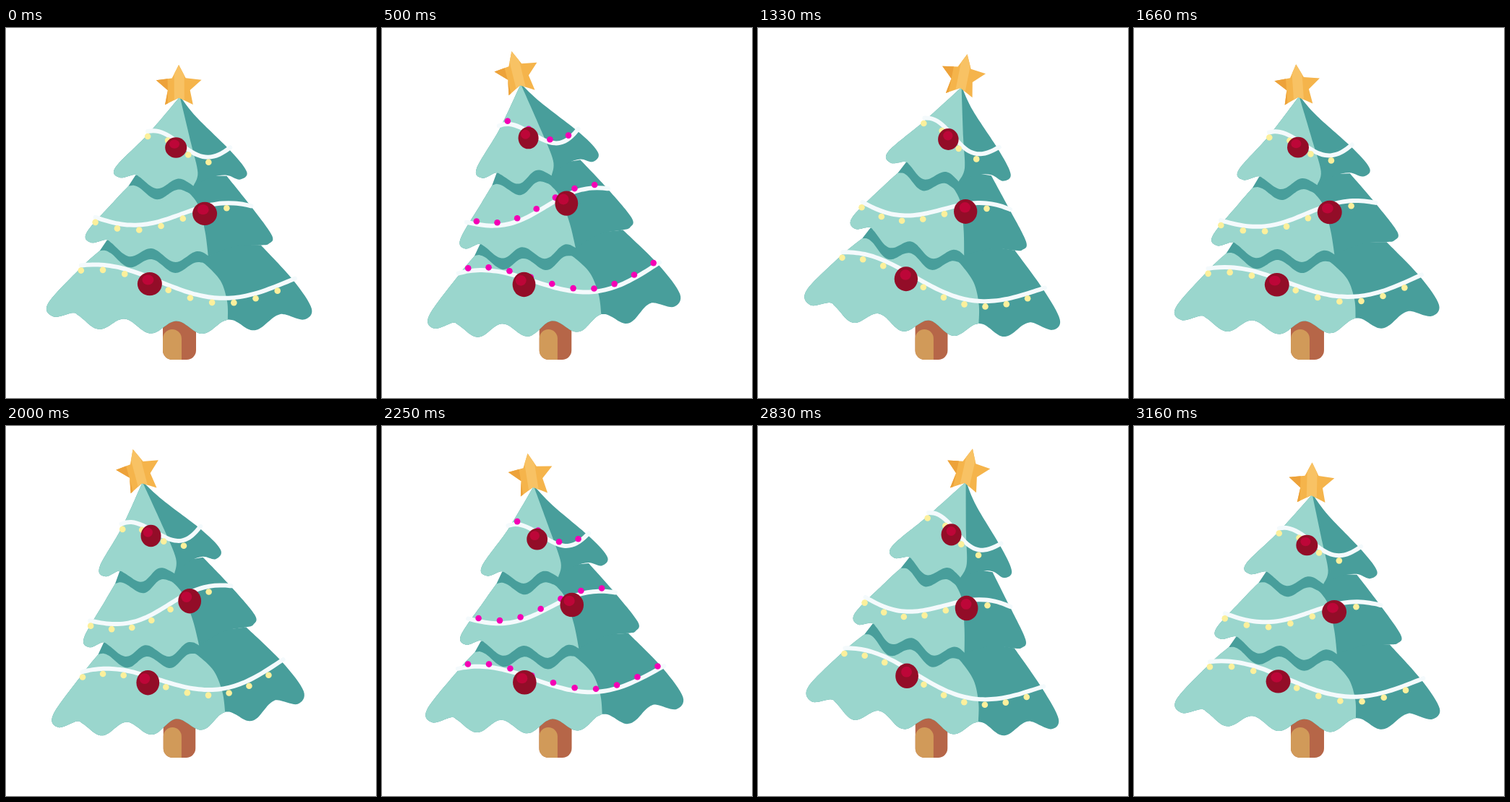
Write an HTML page with a canvas that moves like this. It is 512x512 px and loops after 3250 ms.

```html
<!DOCTYPE html>
<html lang="en">
<head>
<meta charset="utf-8">
<title>Swaying Christmas tree</title>
<style>
  html, body { margin: 0; width: 100%; height: 100%; overflow: hidden; background: #fff; }
  canvas { display: block; }
</style>
</head>
<body>
<canvas id="stage" width="512" height="512"></canvas>
<script>
const ctx = document.getElementById("stage").getContext("2d");
const LOOP = 3250, FRAMES = 39, SWAY = 1600;
const LIGHT = "#9ad6cd", DARK = "#489e9b";

// Cosine wave with crests upwards; bow bends its middle line down around the vertex.
const wave = (crest, half, mean, amp, bow = 0, vertex = 0) => x =>
  mean - bow * (x - vertex) ** 2 - amp * Math.cos(Math.PI * (x - crest) / half);

function sample(f, from, to, shift = 0) {
  const n = Math.ceil(Math.abs(to - from) / 8);
  return Array.from({ length: n + 1 }, (_, i) => {
    const x = from + (to - from) * i / n;
    return [x, f(x) + shift];
  });
}

const TIERS = [
  {
    crest: 178, hem: wave(178, 31, 216, 7.5, 0.0015, 240), split: 260, lobe: 1,
    ridge: [[266, 200], [257, 160], [242, 96]],
    right: [[285, 207], [306, 204], [324, 210], [334, 200], [313, 172], [265, 124], [243, 96]]
  },
  {
    crest: 138, hem: wave(138, 32, 317, 8, 0.001, 266), split: 280, lobe: 1,
    ridge: [[276, 283], [268, 249]],
    right: [[320, 302], [352, 301], [364, 299], [368, 287], [337, 244], [306, 205]]
  },
  {
    crest: 92, hem: wave(92, 36, 414.5, 9, 0.0005, 245), split: 307, lobe: 1.3, hemEnd: 386,
    ridge: [[306, 378], [297, 350]],
    right: [[412, 404], [423, 389], [398, 350], [353, 301]]
  }
];

// Each tier starts under the hem of the tier above it.
TIERS.forEach((tier, i) => {
  const { crest, hem, split, lobe, ridge, right, hemEnd } = tier;
  const above = TIERS[i - 1];
  const top = above ? sample(above.hem, above.split - 3, above.crest - 8, 15) : [];
  const start = above ? top[top.length - 1] : [241, 96];
  const y = hem(crest);
  const outer = [
    start, [197 - 46.5 * i, 147 + 92 * i],
    [crest - 26 * lobe, y - 10 * lobe], [crest - 20 * lobe, y + 4 * lobe],
    ...sample(hem, crest, split)
  ];
  const end = [split, hem(split)];
  const rightRun = [...(hemEnd ? sample(hem, split, hemEnd) : [end]), ...right];
  const peak = above ? [above.crest + 2, above.hem(above.crest + 2)] : start;
  tier.dark = [[peak], outer, rightRun];
  tier.light = [outer, [end, ...ridge, ...top]];
});

const STRANDS = [
  { line: wave(204, 76, 160.5, 18.5), from: 197, to: 311, gap: 28 },
  { line: wave(308, 130, 257.5, 15), from: 124, to: 340, gap: 30.3 },
  { line: wave(122, 180, 350.5, 23.5), from: 104, to: 400, gap: 30.2 }
];

const STAR = Array.from({ length: 10 }, (_, i) => {
  const r = i % 2 ? 0.49 : 1, a = i * Math.PI / 5;
  return [[240.5 + 33 * r * Math.sin(a), 81.5 - 30.5 * r * Math.cos(a)]];
});

let bend, stretch;

// Returns true while the pink lights are on.
function setPose(t) {
  const p = 3.1 + 2 * Math.PI * t / SWAY;
  const sin = Math.sin(p), cos = Math.cos(p);
  bend = (60 * sin - 4) / 62;
  stretch = 1.012 + 0.055 * sin * sin + 0.012 * cos;
  return cos > 0;
}

const squeeze = u => 1 - (stretch - 1) * (0.5 + 2.4 * u * (1 - u));

// Bends a point along the trunk axis, more strongly towards the top.
function warp([x, y]) {
  const h = 415 - y, u = h / 364;
  const lean = bend * (0.062 + 0.1 * u);
  const angle = bend * (0.105 + 0.122 * u);
  const side = (x - 240) * squeeze(u);
  return [
    240 + stretch * h * lean + side * Math.cos(angle),
    415 - stretch * h * (1 - lean * lean / 2) + side * Math.sin(angle)
  ];
}

// Joins smooth runs of points, with a corner between runs.
function trace(runs) {
  ctx.beginPath();
  for (const run of runs) {
    const pts = run.map(warp);
    ctx.lineTo(...pts[0]);
    for (let i = 1; i < pts.length; i++) {
      const a = pts[i - 1], b = pts[i];
      const before = pts[i - 2] || a, after = pts[i + 1] || b;
      ctx.bezierCurveTo(
        a[0] + (b[0] - before[0]) / 6, a[1] + (b[1] - before[1]) / 6,
        b[0] - (after[0] - a[0]) / 6, b[1] - (after[1] - a[1]) / 6, ...b);
    }
  }
}

function fill(color, runs) {
  ctx.fillStyle = color;
  trace(runs);
  ctx.fill();
}

function oval(color, [x, y], rx, ry) {
  ctx.fillStyle = color;
  ctx.beginPath();
  ctx.ellipse(x, y, rx, ry, 0, 0, 7);
  ctx.fill();
}

function box(color, x, w, y, radii) {
  const k = squeeze(0);
  ctx.fillStyle = color;
  ctx.beginPath();
  ctx.roundRect(240 + (x - 240) * k, y, w * k, 459 - y, radii);
  ctx.fill();
}

function band(color, left, right) {
  fill(color, [[[left, 45]], [[right, 45]], [[right, 110]], [[left, 110]]]);
}

function drawStar() {
  ctx.save();
  fill("#f5b44b", STAR);
  ctx.clip();
  band("#eda23a", 205, 225);
  band("#f8c264", 234, 248);
  ctx.restore();
}

function ball(x, y, r) {
  const rx = r * squeeze(0.3), ry = r * 0.95 * stretch;
  const [cx, cy] = warp([x, y]);
  oval("#930d28", [cx, cy], rx, ry);
  oval("#bd0638", [cx - r * 0.14 + bend * 2, cy - r * 0.33], rx * 0.47, ry * 0.43);
}

function drawLights({ line, from, to, gap }, pink) {
  const drop = pink ? -4 : 7;
  for (let x = from + (pink ? gap / 2 : 0); x < to - 8; x += gap) {
    oval(pink ? "#f400b5" : "#fcf09c", warp([x, line(x) + drop]), 4.3, 4.3);
  }
}

function draw(t) {
  const pink = setPose(t);
  ctx.clearRect(0, 0, 512, 512);

  box("#b66648", 217, 46, 395, [0, 0, 13, 13]);
  box("#d19a59", 217, 26, 417, [13, 13, 0, 13]);

  for (const { dark, light } of [...TIERS].reverse()) {
    fill(DARK, dark);
    fill(LIGHT, light);
  }
  drawStar();

  ctx.strokeStyle = "#f4fafc";
  ctx.lineWidth = 6;
  ctx.lineCap = "round";
  for (const strand of STRANDS) {
    trace([sample(strand.line, strand.from, strand.to)]);
    ctx.stroke();
    drawLights(strand, pink);
  }

  ball(236, 165.5, 15);
  ball(275.5, 257, 17);
  ball(199, 354, 17);
}

const begin = performance.now(), STEP = LOOP / FRAMES;

function tick() {
  const t = Math.max(0, performance.now() - begin) % LOOP;
  draw(Math.min(FRAMES - 1, Math.floor((t + 6.7) / STEP)) * STEP);
  requestAnimationFrame(tick);
}
tick();
</script>
</body>
</html>
```
